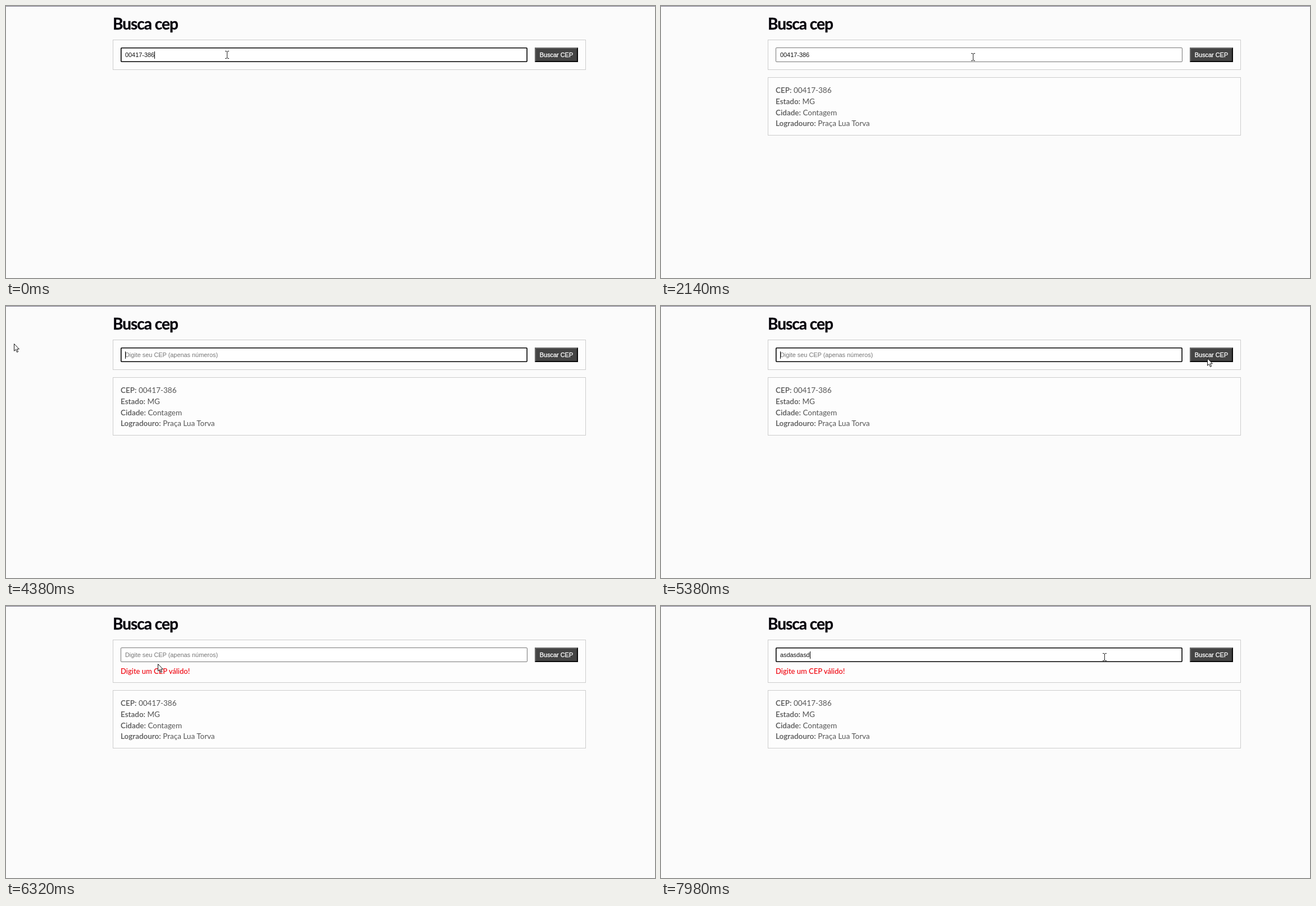
An HTML page that plays this animation: 1155x485 px, repeating every 8 s.

```html
<!DOCTYPE html>
<html lang="pt-BR">
<head>
<meta charset="utf-8">
<title>Busca cep</title>
<style>
  * { box-sizing: border-box; }
  html, body { margin: 0; width: 100%; height: 100%; overflow: hidden; background: #fbfbfb; }
  #stage { position: absolute; left: 0; top: 0; width: 1155px; height: 485px; overflow: hidden;
    background: #fbfbfb; border-top: 1px solid #777487; }
  #stage > * { position: absolute; margin: 0; white-space: pre; }
  h1 { left: 190px; top: 10px; font: 700 28px/40px Lato, sans-serif; letter-spacing: -1px; color: #06040c;
    -webkit-text-stroke: .3px #06040c; }
  .panel { left: 190px; width: 842px; border: 1px solid #ccc; background: #fdfdfd; }
  #form { top: 59px; height: 54px; }
  #result { top: 126px; height: 104px; padding: 13px 13px 0; font: 400 13.5px/19.75px Lato, sans-serif; color: #555; }
  #result b { font-weight: 600; }
  #error { left: 204px; top: 105px; font: 500 13px/20px Lato, sans-serif; color: #f0000c; }
  #field, #button, #selection { font: 400 10.9px/27px "Liberation Sans", Arial, sans-serif; }
  #field { left: 204px; top: 73px; width: 724px; height: 26px; padding-left: 8px; border-radius: 2px;
    background: #fff; color: #111; box-shadow: inset 0 0 0 1px #767676; }
  #field.focus { box-shadow: inset 0 0 0 1.6px #000; }
  #hint { color: #757575; }
  #caret { display: inline-block; width: 1px; height: 13px; margin-right: -1px; vertical-align: -3px; background: #000; }
  #selection { left: 212px; top: 80px; height: 13px; line-height: 13px; background: #3390ff; color: #fff;
    -webkit-text-stroke: .25px #fff; }
  #button { left: 941px; top: 73px; width: 77px; height: 26px; line-height: 23px; text-align: center;
    background: #444; color: #fff; border: 2px solid; border-color: #6b6b6b #0a0a0a #0a0a0a #6b6b6b;
    -webkit-text-stroke: .3px #fff; }
  #button.down { border-color: #0a0a0a #6b6b6b #6b6b6b #0a0a0a; }
  #pointer { left: 0; top: -1px; width: 20px; height: 20px; overflow: visible; }
</style>
</head>
<body>
<div id="stage">
  <h1>Busca cep</h1>
  <div id="form" class="panel"></div>
  <div id="field"><span id="value"></span><span id="caret"></span><span id="hint">Digite seu CEP (apenas números)</span></div>
  <div id="selection">00417-386</div>
  <div id="button">Buscar CEP</div>
  <div id="error">Digite um CEP válido!</div>
  <div id="result" class="panel"><b>CEP:</b> 00417-386
<b>Estado:</b> MG
<b>Cidade:</b> Contagem
<b>Logradouro:</b> Praça Lua Torva</div>
  <svg id="pointer">
    <path id="arrow" d="M.5 .5V13.2L3.4 10.5 5.5 15.4 7.6 14.5 5.5 9.8H9.4Z" fill="#fff" stroke="#111"/>
    <path id="beam" d="M-3 -6.5H-1L.5 -5.5 2 -6.5H4M.5 -5.5V5.5M-3 6.5H-1L.5 5.5 2 6.5H4" fill="none" stroke="#222"/>
  </svg>
</div>
<script>
const LOOP = 8000;
const CODE = "00417-386";
const TYPED = "asdasdasd";
const $ = id => document.getElementById(id);
const within = (t, from, to) => t >= from && t < to;
const show = (id, on) => { $(id).style.display = on ? "" : "none"; };

const ease = {
  line: k => k,
  in: k => k * k,
  out: k => k * (2 - k),
  both: k => k * k * (3 - 2 * k)
};

// Pointer stops: time, x, y, easing on the way there
const path = [
  [0, 393, 87], [340, 393, 87], [950, 980, 86, "both"],
  [1830, 980, 86], [1950, 915, 92, "in"], [2260, 330, 91, "line"], [2400, 275, 89, "out"],
  [2620, 187, 69, "in"], [2700, 40, 68, "line"], [2850, 14, 67, "out"],
  [4780, 14, 67], [5060, 430, 156, "in"], [5350, 972, 93, "out"],
  [5590, 972, 93], [5650, 967, 92, "line"], [5890, 967, 92],
  [6320, 271, 103, "both"], [6440, 208, 92, "out"], [6690, 283, 87, "both"],
  [6990, 283, 87], [7700, 662, 91, "line"], [7980, 789, 91, "line"], [LOOP, 789, 91]
];

function pointerAt(t) {
  const i = path.findIndex(stop => stop[0] > t);
  const [t0, x0, y0] = path[i - 1];
  const [t1, x1, y1, kind = "line"] = path[i];
  const k = ease[kind]((t - t0) / (t1 - t0));
  return [Math.round(x0 + (x1 - x0) * k), Math.round(y0 + (y1 - y0) * k)];
}

function valueAt(t) {
  if (t < 4380) return CODE;
  const count = Math.floor((t - 6940) / 70);
  return TYPED.slice(0, Math.max(0, count));
}

function render(t) {
  const [x, y] = pointerAt(t);
  const inField = x >= 204 && x < 928 && y >= 74 && y < 100;
  $("pointer").style.transform = `translate(${x}px, ${y}px)`;
  show("beam", inField);
  show("arrow", !inField);

  const value = valueAt(t);
  const focused = t < 970 || within(t, 2400, 5500) || t >= 6900;
  const selecting = within(t, 2440, 4380);
  const blinkOff = within(t, 4880, 5380);
  $("field").classList.toggle("focus", focused);
  $("button").classList.toggle("down", within(t, 970, 1050) || within(t, 5500, 5590));
  $("value").textContent = value;
  show("hint", !value);
  show("caret", focused && !selecting && !blinkOff);

  // The selection grows leftwards from the end of the text
  show("selection", selecting);
  const left = t >= 2700 ? 0 : Math.max(12, 52 - Math.floor((t - 2440) / 30) * 6);
  $("selection").style.clipPath = `inset(0 0 0 ${left}px)`;

  const invalid = t >= 5590;
  show("error", invalid);
  show("result", t >= 1080);
  $("form").style.height = (invalid ? 77 : 54) + "px";
  $("result").style.top = (invalid ? 149 : 126) + "px";
}

const start = performance.now();
function tick() {
  render((performance.now() - start) % LOOP);
  requestAnimationFrame(tick);
}
tick();
</script>
</body>
</html>
```
